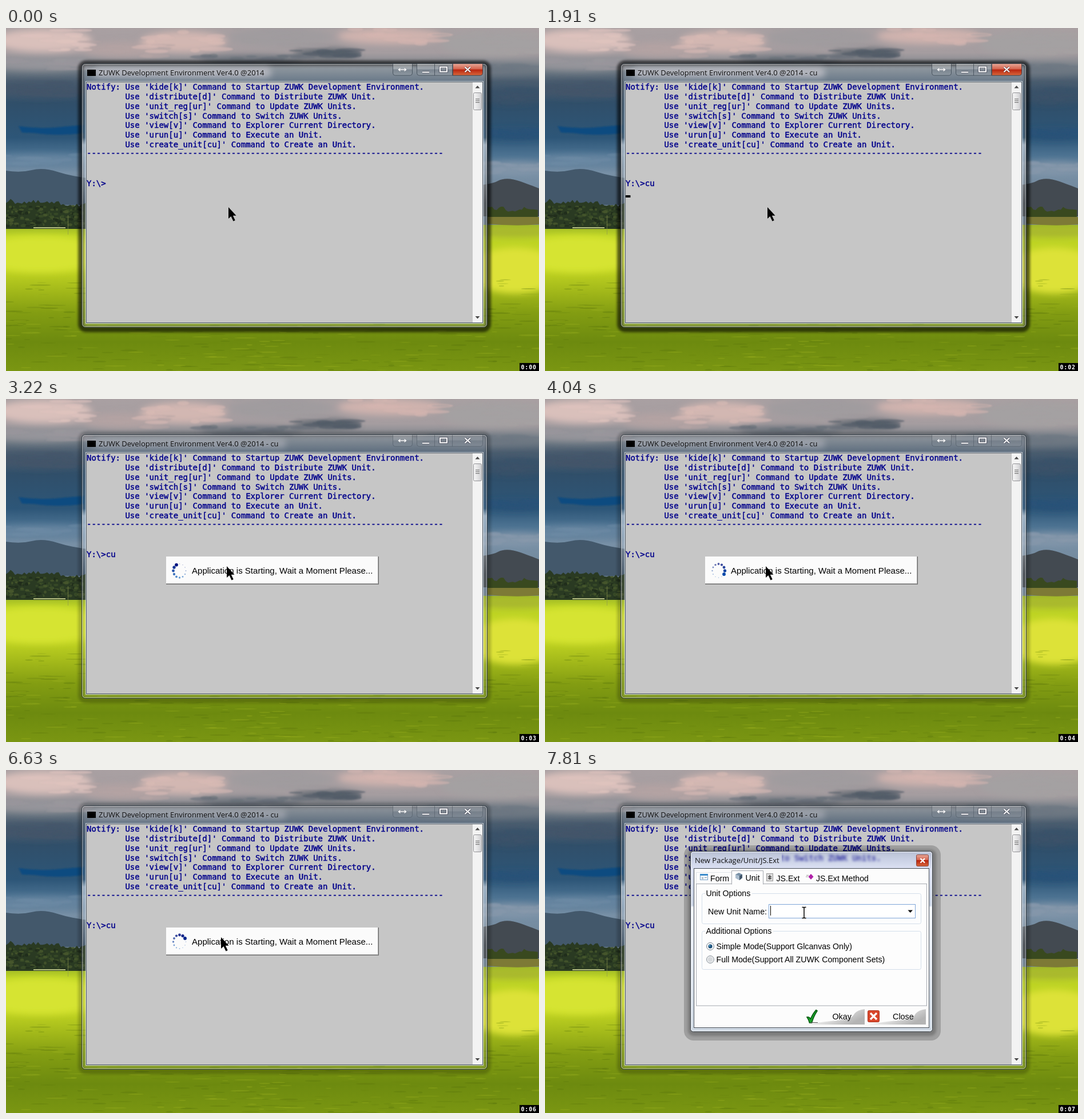
Animation of 932x601 px, one loop 8000 ms. Source, as an HTML page:

```html
<!DOCTYPE html>
<html lang="en">
<head>
<meta charset="utf-8">
<title>Console</title>
<style>
html, body { margin: 0; width: 100%; height: 100%; overflow: hidden; background: #4c6478; }
svg { display: block; width: 932px; height: 601px; }
text { white-space: pre; }
.mono { font: 14px "DejaVu Sans Mono", monospace; fill: #00008b; stroke: #00008b; stroke-width: .45; }
.cap { font: 13px "Open Sans", sans-serif; fill: #111; }
.ui { font: 14.15px "Liberation Sans", Arial, sans-serif; fill: #000; }
.clock { font: bold 10px "DejaVu Sans Mono", monospace; letter-spacing: .8px; fill: #fff; }
</style>
</head>
<body>
<svg viewBox="0 0 932 601" xmlns="http://www.w3.org/2000/svg">
<defs>
  <linearGradient id="sky" x1="0" y1="0" x2="0" y2="310" gradientUnits="userSpaceOnUse">
    <stop offset="0" stop-color="#a9a0a2"/><stop offset=".14" stop-color="#a59da0"/>
    <stop offset=".22" stop-color="#7b838b"/><stop offset=".3" stop-color="#4b5d6f"/>
    <stop offset=".43" stop-color="#304f6a"/><stop offset=".62" stop-color="#2d5678"/>
    <stop offset=".72" stop-color="#4d7392"/><stop offset=".82" stop-color="#7890a6"/>
    <stop offset="1" stop-color="#6f8496"/>
  </linearGradient>
  <linearGradient id="grass" x1="0" y1="345" x2="0" y2="601" gradientUnits="userSpaceOnUse">
    <stop offset="0" stop-color="#9cb628"/><stop offset=".08" stop-color="#bdd424"/>
    <stop offset=".3" stop-color="#c2d522"/><stop offset=".45" stop-color="#a3b91a"/>
    <stop offset=".6" stop-color="#839d12"/><stop offset=".8" stop-color="#6d8a0f"/>
    <stop offset="1" stop-color="#7a9612"/>
  </linearGradient>
  <linearGradient id="side" x1="0" y1="94" x2="0" y2="520" gradientUnits="userSpaceOnUse">
    <stop offset=".23" stop-color="#fff" stop-opacity="0"/><stop offset=".26" stop-color="#f2f7ff" stop-opacity=".5"/>
    <stop offset=".36" stop-color="#e0eaf5" stop-opacity=".3"/><stop offset=".5" stop-color="#fff" stop-opacity="0"/>
  </linearGradient>
  <linearGradient id="red" x1="0" y1="0" x2="0" y2="1">
    <stop offset="0" stop-color="#e8a898"/><stop offset=".48" stop-color="#d4604a"/>
    <stop offset=".5" stop-color="#b8230e"/><stop offset="1" stop-color="#d8673c"/>
  </linearGradient>
  <linearGradient id="glass" x1="0" y1="0" x2="0" y2="1">
    <stop offset="0" stop-color="#fff" stop-opacity=".35"/><stop offset=".48" stop-color="#fff" stop-opacity=".15"/>
    <stop offset=".5" stop-color="#123" stop-opacity=".1"/><stop offset="1" stop-color="#fff" stop-opacity=".15"/>
  </linearGradient>
  <linearGradient id="dlg" x1="0" y1="0" x2="0" y2="1">
    <stop offset="0" stop-color="#b9c1d4"/><stop offset=".05" stop-color="#cbd2e6"/>
    <stop offset=".1" stop-color="#dde2f4"/><stop offset=".3" stop-color="#c9d3e3"/>
    <stop offset=".31" stop-color="#f0f4fb"/><stop offset="1" stop-color="#cfd9e4"/>
  </linearGradient>
  <linearGradient id="btn" x1="0" y1="0" x2="1" y2=".5">
    <stop offset=".2" stop-color="#fcfcfc"/><stop offset=".6" stop-color="#dedede"/><stop offset="1" stop-color="#b4b4b4"/>
  </linearGradient>
  <linearGradient id="thumb"><stop offset="0" stop-color="#f8f8f8"/><stop offset="1" stop-color="#cfcfd2"/></linearGradient>
  <filter id="b1"><feGaussianBlur stdDeviation="1"/></filter>
  <filter id="b2" x="-20%" y="-50%" width="140%" height="200%"><feGaussianBlur stdDeviation="2.2"/></filter>
  <filter id="b6" x="-20%" y="-50%" width="140%" height="200%"><feGaussianBlur stdDeviation="6"/></filter>
  <clipPath id="smear"><rect x="414" y="144" width="180" height="27"/></clipPath>
</defs>

<rect width="932" height="350" fill="url(#sky)"/>
<g id="haze" filter="url(#b6)"></g>
<g id="clouds" filter="url(#b1)"></g>
<path d="M0 250Q25 254 45 249T90 252T150 264V310H0Z" fill="#43586b"/>
<path d="M800 277Q845 276 860 268T900 269T932 281V330H800Z" fill="#434a51"/>
<rect y="345" width="932" height="256" fill="url(#grass)"/>
<g filter="url(#b6)">
  <ellipse cx="60" cy="396" rx="120" ry="32" fill="#d6e432"/>
  <ellipse cx="890" cy="425" rx="80" ry="40" fill="#dde238"/>
  <ellipse cx="890" cy="358" rx="80" ry="9" fill="#a9b82e"/>
</g>
<g id="land"></g>

<rect id="shade" x="131" y="62" width="712" height="466" rx="9" fill="none" stroke="#000" stroke-width="10" filter="url(#b2)"/>
<rect id="tint" x="133" y="63" width="708" height="461" rx="5" fill="#e8eef6"/>
<rect x="133" y="94" width="708" height="430" fill="url(#side)"/>
<rect id="glow" x="152" y="69" width="312" height="18" rx="9" fill="#d8d4da" filter="url(#b6)"/>
<rect x="132.500" y="62.500" width="709" height="462" rx="6" fill="none" stroke="#1f2a33" stroke-opacity=".85"/>
<rect x="133.500" y="63.500" width="707" height="460" rx="5" fill="none" stroke="#fff" stroke-opacity=".5"/>
<rect x="142" y="73" width="15" height="11" fill="#000"/>
<text id="title" class="cap" x="162" y="83"></text>

<g stroke="#27333f" stroke-opacity=".6">
  <g id="frames">
    <path d="M676.500 62.500H710.500V79a4 4 0 0 1-4 4H680.500a4 4 0 0 1-4-4Z" fill="url(#glass)"/>
    <path d="M718.500 62.500H833.500V79a4 4 0 0 1-4 4H722.500a4 4 0 0 1-4-4Z" fill="url(#glass)"/>
    <path d="M749.500 63V83M780.500 63V83"/>
  </g>
  <path id="hot" d="M781.500 62.500H833.500V79a4 4 0 0 1-4 4H781.500Z" fill="url(#red)"/>
</g>
<g fill="none" stroke="#334" stroke-width="4" stroke-opacity=".55" id="glyphs">
  <path d="M687 73H699M689.500 70.500L686.500 73L689.500 75.500M696.500 70.500L699.500 73L696.500 75.500" stroke-width="1.500"/>
  <path d="M728 77.500H740"/><path d="M759 68.500H771V76.500H759Z"/><path d="M802.500 68.500L812 77M812 68.500L802.500 77"/>
</g>
<use href="#glyphs" id="white"/>

<rect x="139.500" y="93.500" width="695" height="424" fill="#c6c6c6" stroke="#e4ecf2" stroke-opacity=".7"/>
<rect x="140.500" y="94.500" width="693" height="422" fill="#c6c6c6" stroke="#4a5560"/>
<rect x="816" y="95" width="17" height="421" fill="#f3f3f3"/>
<path d="M820.500 105.500L824.500 101L828.500 105.500ZM820.500 505L824.500 509.500L828.500 505Z" fill="#4a4a4a"/>
<rect x="817.500" y="113.500" width="14" height="30" rx="2" fill="url(#thumb)" stroke="#8f8f93"/>
<path d="M821 124.500H828M821 127.500H828M821 130.500H828" stroke="#666"/>
<g id="lines"></g>
<rect id="caret" width="8.400" height="4" fill="#000"/>

<g id="splash">
  <rect x="280" y="276" width="372" height="49" fill="#6f6f6f"/>
  <rect x="280" y="276" width="371" height="48" fill="#a5a5a5"/>
  <rect x="280" y="276" width="370" height="47" fill="#fbfbfb"/>
  <g id="spin"></g>
  <text x="325" y="306" class="ui" style="font-size:15.050px">Application is Starting, Wait a Moment Please...</text>
</g>

<g id="dialog">
  <rect x="243" y="132" width="449" height="342" rx="17" fill="#000" opacity=".2"/>
  <rect x="250" y="139" width="434" height="327" rx="10" fill="#000" opacity=".22" filter="url(#b2)"/>
  <rect x="254.500" y="142.500" width="423" height="316" rx="5" fill="url(#dlg)" stroke="#333b44"/>
  <g clip-path="url(#smear)"><text id="blur" class="mono" x="141" y="158.500" filter="url(#b2)" opacity=".75"></text></g>
  <rect x="255.500" y="143.500" width="421" height="314" rx="4" fill="none" stroke="#fff" stroke-opacity=".8"/>
  <text class="cap" x="262" y="163">New Package/Unit/JS.Ext</text>
  <rect x="649.500" y="148.500" width="21" height="20" rx="2" fill="url(#red)" stroke="#8a4038"/>
  <path d="M656.500 155L664 162.500M664 155L656.500 162.500" stroke="#fff" stroke-width="2.400"/>
  <rect x="260.500" y="172.500" width="411" height="279" fill="#fcfcfc" stroke="#454c55"/>
  <path id="face" d="M457 446Q475 443 490 441L528 437Q538 434 541 427Q547 420 559 419V446Z" fill="url(#btn)"/>
  <use href="#face" x="107"/>
  <path d="M458 433Q462 432 464.500 436Q468 427 474 420.500L476 422Q469.500 432 466.500 443H462.500Q461 437 458 433Z" fill="#18a428" stroke="#0b5c14" stroke-width="1.600"/>
  <path d="M464 442.500H477" stroke="#555"/>
  <rect x="564.500" y="421.500" width="20" height="20" rx="2" fill="#d9472b" stroke="#a83420"/>
  <path d="M569 426L580 437M580 426L569 437" stroke="#fff" stroke-width="3.200"/>
  <text class="ui" x="502.500" y="437" style="font-size:14.300px">Okay</text>
  <g id="tabs">
    <text class="ui" x="608" y="437" style="font-size:14.400px">Close</text>
    <rect x="264.500" y="199.500" width="403" height="213.500" fill="#fdfdfd" stroke="#a5a9b0"/>
    <path d="M264.500 199V179.500H326" fill="none" stroke="#dfe3e8"/>
    <path d="M326.500 200.500V176.500H381.500V200.500" fill="#fdfdfd" stroke="#a5a9b0"/>
    <path d="M327 200H381" stroke="#fdfdfd" stroke-width="2"/>
    <rect x="271.500" y="182.500" width="13" height="10" fill="#eef5fb" stroke="#7ba3c8"/>
    <path d="M271 183.500H285" stroke="#3c8ccc" stroke-width="3"/><path d="M274 188.500H277M279 188.500H283M274 190.500H277" stroke="#89a"/>
    <path d="M333 183L339 180L345 183V189L340 193L333 189Z" fill="#7890a6"/><path d="M333 183L340 185.500V193L333 189Z" fill="#a9bccd"/><path d="M340 185.500L345 183V189L340 193Z" fill="#42566b"/>
    <rect x="387.500" y="181.500" width="11" height="13" fill="#ddd" stroke="#999"/><path d="M393 184V192M390 187H396M390 190H396" stroke="#444" stroke-width="1.500"/>
    <path d="M465 182L469.500 187L465 192L460.500 187Z" fill="#b020a8"/><path d="M457 184.500H461M456 187H460" stroke="#999"/>
    <text class="ui" x="289" y="195">Form</text><text class="ui" x="350.500" y="193.500">Unit</text>
    <text class="ui" x="404.500" y="195">JS.Ext</text><text class="ui" x="474" y="195">JS.Ext Method</text>
  </g>
  <g id="page">
    <g fill="none" stroke="#d3deea"><rect x="274.500" y="216.500" width="383" height="53" rx="3"/><rect x="274.500" y="282.500" width="383" height="67" rx="3"/></g>
    <path d="M280 216.500H362M280 282.500H399" stroke="#fdfdfd" stroke-width="3"/>
    <text class="ui" x="281.500" y="221">Unit Options</text><text class="ui" x="281.500" y="287">Additional Options</text>
    <text class="ui" x="285" y="253">New Unit Name:</text>
    <rect id="field" x="391.500" y="235.500" width="256" height="24" fill="#fff"/>
    <path d="M634.500 245.500H643L638.750 250Z"/>
    <path id="bar" d="M394.500 238V255" stroke="#000"/>
    <circle id="radio" cx="289" cy="309" r="6.500" fill="#f4f6f8"/>
    <circle cx="289" cy="309" r="3.500" fill="#174d78"/><circle cx="288" cy="308" r="1.300" fill="#63b4dc"/>
    <circle cx="289" cy="332" r="6.500" fill="#e9ebed" stroke="#8b949c"/><circle cx="289" cy="332" r="4" fill="#d6d9dc"/>
    <text class="ui" x="299.500" y="314">Simple Mode(Support Glcanvas Only)</text>
    <text class="ui" id="full" x="299.500" y="337"></text>
  </g>
</g>

<path id="arrow" d="M0 0V20L4.500 16L8.500 24.500L11.700 23L7.800 14.800H13.500Z" fill="#000"/>
<path id="beam" d="M449.500 240.500H452L453 241.500L454 240.500H456.500M449.500 259.500H452L453 258.500L454 259.500H456.500M453 241V259" fill="none" stroke="#000" stroke-width="1.500"/>
<rect x="898" y="587" width="34" height="14" fill="#000"/>
<text id="clock" class="clock" x="900.500" y="597.500"></text>
</svg>
<script>
const $ = id => document.getElementById(id);
const NS = "http://www.w3.org/2000/svg";
const LOOP = 8000, APP = "ZUWK";

function add(parent, tag, attrs, text) {
  const el = document.createElementNS(NS, tag);
  for (const k in attrs) el.setAttribute(k, attrs[k]);
  if (text) el.textContent = text;
  return $(parent).appendChild(el);
}

let seed = 7;
const rnd = () => (seed = seed * 16807 % 2147483647) / 2147483647;
const range = (a, b) => a + (b - a) * rnd();
const pick = list => list[Math.floor(rnd() * list.length)];
const blob = (parent, cx, cy, rx, ry, fill, opacity = 1) =>
  add(parent, "ellipse", { cx, cy, rx, ry, fill, opacity });

// A soft mass with many small wisps of the same tone
function cloud(cx, cy, rx, ry, fill) {
  blob("haze", cx, cy, rx, ry, fill, .9);
  for (let i = 0; i < 14; i++)
    blob("clouds", cx + range(-1, 1) * rx, cy + range(-1, 1) * ry, range(8, 30), range(1.5, 4), fill, .6);
}

function drawScene() {
  cloud(65, 22, 85, 20, "#dfc4be");
  cloud(205, 38, 70, 14, "#b4a3a4");
  cloud(310, 24, 75, 18, "#d8bab4");
  cloud(480, 16, 90, 18, "#a09c9f");
  cloud(670, 14, 90, 14, "#d4b5b0");
  cloud(850, 28, 90, 22, "#a5a1a2");
  cloud(60, 64, 80, 10, "#9a979d");
  cloud(430, 56, 90, 8, "#686f78");
  cloud(560, 44, 58, 8, "#525c68");
  cloud(830, 72, 110, 10, "#6d7782");
  cloud(60, 108, 90, 12, "#43566a");
  cloud(885, 118, 60, 14, "#3a5269");
  cloud(890, 186, 60, 8, "#2b5378");
  cloud(60, 230, 90, 8, "#6c89a3");
  cloud(890, 245, 60, 10, "#8798ab");
  add("clouds", "path", { d: "M22 172Q60 178 100 173L136 170V184Q90 190 50 184L28 183Z", fill: "#0f4b80" });

  let left = "M0 352V304", right = "M842 332V320";
  for (let x = 0; x <= 140; x += 4) left += `L${x} ${range(299, 308) + x / 22}`;
  for (let x = 842; x <= 932; x += 4) right += `L${x} ${range(313, 322)}`;
  add("land", "path", { d: right + "V334H842Z", fill: "#39491f" });
  add("land", "path", { d: "M842 331H932V344Q890 348 842 343Z", fill: "#7d7a36" });
  add("land", "path", { d: left + "V352Z", fill: "#2a3a22" });
  for (let i = 0; i < 160; i++)
    blob("land", range(0, 136), range(312, 348), range(1, 5), range(1, 3), pick(["#47582d", "#1f2c1b", "#394c28"]), .8);
  add("land", "path", { d: "M48 350H104", stroke: "#b5bd80", "stroke-width": 2 });
  add("land", "path", { d: "M108.500 328V362", stroke: "#8d9650", opacity: .6 });
  for (let i = 0; i < 420; i++) {
    const y = range(440, 601);
    blob("land", range(0, 932), y, range(4, 20), range(.5, 1.6), pick(["#5c770c", "#93aa1c", "#6c860f"]), .4);
  }
}

const notes = ["'kide[k]' Command to Startup APP Development Environment.", "'distribute[d]' Command to Distribute APP Unit.",
  "'unit_reg[ur]' Command to Update APP Units.", "'switch[s]' Command to Switch APP Units.",
  "'view[v]' Command to Explorer Current Directory.", "'urun[u]' Command to Execute an Unit.",
  "'create_unit[cu]' Command to Create an Unit."]
  .map((s, i) => (i ? "        " : "Notify: ") + "Use " + s.replace("APP", APP));
const line = (i, s) => add("lines", "text", { class: "mono", x: 141, y: 108 + 16.85 * i }, s);

drawScene();
notes.forEach((s, i) => line(i, s));
line(6.9, "-".repeat(74));
const prompt = line(10, "Y:\\>");
$("blur").textContent = notes[3];
$("full").textContent = `Full Mode(Support All ${APP} Component Sets)`;
const white = $("glyphs").cloneNode(true);
white.removeAttribute("id");
white.setAttribute("stroke", "#fff");
white.setAttribute("stroke-width", "2");
white.setAttribute("stroke-opacity", "1");
$("white").replaceWith(white);

const dots = Array.from({ length: 12 }, (_, i) => {
  const a = i * Math.PI / 6, y = 301 + 12 * Math.sin(a), k = (y - 289) / 24;
  return add("spin", "circle", { cx: 303.5 + 11 * Math.cos(a), cy: y, fill: `rgb(0,${16 + 75 * k},${125 + 60 * k})` });
});

// Last entry whose start time has passed
const at = (list, t) => list.reduce((r, e) => e[0] <= t ? e : r, list[0]);
const mouse = [[0, 389, 314], [690, 395, 313], [820, 401, 313], [960, 395, 313], [1060, 389, 314], [2850, 364, 307],
  [3000, 375, 300], [3110, 386, 293], [5840, 376, 294], [5990, 376, 293], [6750, 373, 299],
  [6900, 390, 302], [7020, 418, 298], [7170, 418, 290], [7320, 430, 270], [7430, 445, 255]];
const carets = [[0], [140, 175, 276], [410], [690, 191, 276], [1210], [1790, 141, 293], [2010]];
const ticks = [1060, 1910, 3110, 4030, 5260, 6250, 7430];
const turns = [3000, 3110, 3220, 3370, 3490, 3640, 3770, 3920, 4140, 4260, 5690, 5840, 5990, 6140, 6250, 6360, 6510, 6630];
const passed = (list, t) => list.filter(e => e <= t).length;
const set = (el, k, v) => { if (el.getAttribute(k) !== String(v)) el.setAttribute(k, v); };
const show = (id, on) => set($(id), "visibility", on ? "visible" : "hidden");
const write = (el, s) => { if (el.textContent !== s) el.textContent = s; };

function draw(t) {
  const active = t < 2010;
  write(prompt, t < 410 ? "Y:\\>" : "Y:\\>cu");
  write($("title"), `${APP} Development Environment Ver4.0 @2014` + (t < 1790 ? "" : " - cu"));
  write($("clock"), "0:0" + passed(ticks, t));
  set($("shade"), "opacity", active ? .6 : .2);
  set($("tint"), "opacity", active ? .2 : .12);
  set($("frames"), "opacity", active ? 1 : .5);
  set($("glow"), "opacity", active ? .6 : .35);
  set($("glow"), "width", t < 1790 ? 312 : 338);
  show("hot", active);

  const [, cx, cy] = at(carets, t);
  show("caret", cx);
  if (cx) { set($("caret"), "x", cx); set($("caret"), "y", cy); }

  show("splash", t >= 3000 && t < 6750);
  const head = passed(turns, t) + 5;
  dots.forEach((dot, i) => {
    const age = ((head - i) % 12 + 12) % 12;
    set(dot, "r", Math.max(.7, 2.9 - age * .25));
    set(dot, "opacity", Math.max(.4, 1 - age * .08));
  });

  show("dialog", t >= 6750);
  show("tabs", t >= 6900);
  show("page", t >= 7020);
  show("bar", t >= 7810);
  set($("field"), "stroke", t >= 7690 ? "#7fa6d8" : "#b4c4d6");
  set($("radio"), "stroke", t >= 7020 && t < 7320 ? "#3c9ad0" : "#7b8791");

  const [, mx, my] = at(mouse, t);
  set($("arrow"), "transform", `translate(${mx} ${my})`);
  show("arrow", t < 7550);
  show("beam", t >= 7550);
}

const start = performance.now();
function frame(now) {
  draw(Math.max(0, now - start) % LOOP);
  requestAnimationFrame(frame);
}
draw(0);
requestAnimationFrame(frame);
</script>
</body>
</html>
```
